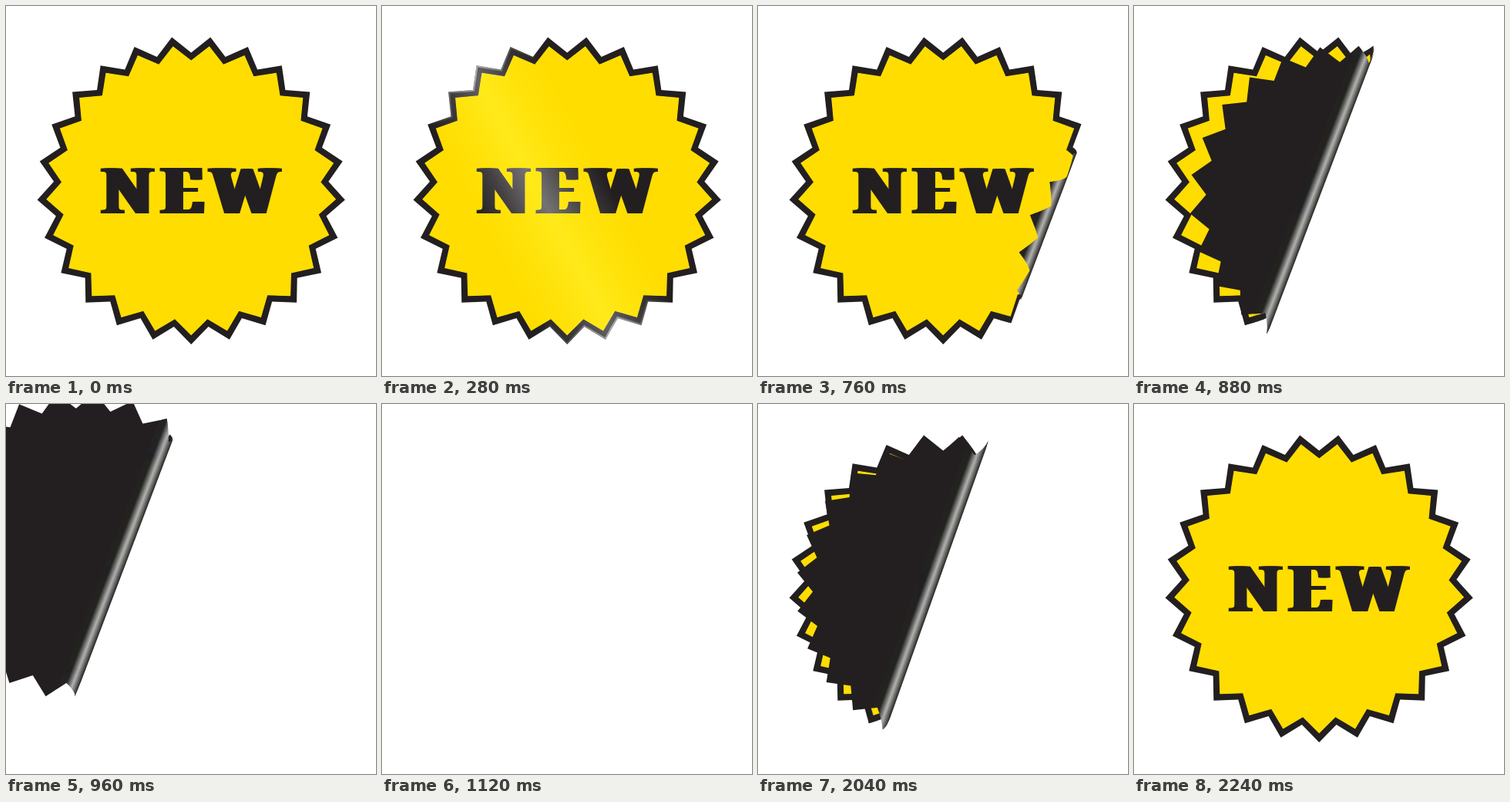
Recreate the animation shown at these times as an HTML page with a canvas. Size 480x480 px, loop 2400 ms.

```html
<!DOCTYPE html>
<html>
<head>
<meta charset="utf-8">
<style>
  html, body { margin: 0; width: 100%; height: 100%; overflow: hidden; background: #fff; }
  canvas { display: block; width: 480px; height: 480px; }
</style>
</head>
<body>
<canvas id="stage" width="480" height="480"></canvas>
<script>
const ctx = document.getElementById('stage').getContext('2d');
const INK = '#231f20', YELLOW = '#ffdd00';
const LOOP = 2400, STEP = 40;
const degrees = d => d * Math.PI / 180;
const PEEL_TILT = degrees(20.8), RETURN_TILT = degrees(19.6);
const SHINE_TILT = degrees(-28);
const ROLL = 24.5;                   // radius of the curl
const HALF_TURN = Math.PI * ROLL;
const SPEED = 47.1 / STEP;           // px per ms
const SLICES = 32;                   // per quarter of the curl
const FAR = 800;

function star(outer, inner) {
  const path = new Path2D();
  for (let i = 0; i < 50; i++) {
    const angle = Math.PI / 2 + i * Math.PI / 25;
    const radius = i % 2 ? inner : outer;
    path.lineTo(radius * Math.cos(angle), radius * Math.sin(angle));
  }
  path.closePath();
  return path;
}
const rim = star(200, 178.5);
const face = star(188.3, 168.5);
const border = new Path2D(rim);
border.addPath(star(187.5, 167.7));

function drawFront() {
  ctx.fillStyle = INK;
  ctx.fill(border, 'evenodd');
  ctx.fillStyle = YELLOW;
  ctx.fill(face);
  ctx.fillStyle = INK;
  ctx.font = '900 81px "Noto Serif", serif';
  ctx.letterSpacing = '13px';
  ctx.textAlign = 'center';
  // Sideways copies fatten the stems and keep the serifs thin.
  for (let dx = -5; dx <= 5; dx += 2.5) ctx.fillText('NEW', 5.5 + dx, 30);
}

function drawBack(color) {
  ctx.fillStyle = color;
  ctx.fill(rim);
}

// Draws the strip s0..s1 of the flat sticker squeezed into x0..x1.
function strip(tilt, s0, s1, x0, x1, draw) {
  const scale = (x1 - x0) / (s1 - s0);
  const overlap = .6 / Math.abs(scale);
  ctx.save();
  ctx.rotate(tilt);
  ctx.translate(x0, 0);
  ctx.scale(scale, 1);
  ctx.translate(-s0, 0);
  ctx.beginPath();
  ctx.rect(s0 - overlap, -260, s1 - s0 + overlap, 520);
  ctx.clip();
  ctx.rotate(-tilt);
  draw();
  ctx.restore();
}

function curlColor(depth) {
  const level = 33 + 145 * Math.max(0, 1 - Math.abs(depth - 8.5) / 8.5);
  return `rgb(${level},${level},${level})`;
}

function drawPeel(tilt, edge) {
  const start = edge - ROLL, end = start + HALF_TURN;
  strip(tilt, start - FAR, start, start - FAR, start, drawFront);
  for (let i = 0; i < 2 * SLICES; i++) {
    const rising = i < SLICES;
    const height = k => rising ? k / SLICES : 2 - k / SLICES;
    const arc = k => rising ? Math.asin(height(k)) : Math.PI - Math.asin(height(k));
    const color = curlColor(ROLL * (1 - height(i + .5)));
    strip(tilt, start + ROLL * arc(i), start + ROLL * arc(i + 1),
      start + ROLL * height(i), start + ROLL * height(i + 1),
      rising ? drawFront : () => drawBack(color));
  }
  strip(tilt, end, end + FAR, start, start - FAR, () => drawBack(INK));
}

function drawShine(center) {
  const dx = Math.cos(SHINE_TILT), dy = Math.sin(SHINE_TILT);
  const band = peak => {
    const a = center - 85, b = center + 85;
    const g = ctx.createLinearGradient(a * dx, a * dy, b * dx, b * dy);
    [0, .4, 1, .4, 0].forEach((level, i) =>
      g.addColorStop(i / 4, `rgba(255,255,255,${peak * level})`));
    return g;
  };
  ctx.save();
  ctx.clip(rim);
  ctx.globalCompositeOperation = 'color-dodge';
  ctx.fillStyle = band(.3);
  ctx.fill(rim);
  ctx.globalCompositeOperation = 'source-over';
  ctx.fillStyle = band(.1);
  ctx.fill(face);
  ctx.strokeStyle = band(.5);
  ctx.lineWidth = 4;
  ctx.stroke(rim);
  ctx.restore();
}

function render(now) {
  const t = Math.floor(now % LOOP / STEP) * STEP;
  ctx.setTransform(1, 0, 0, 1, 0, 0);
  ctx.clearRect(0, 0, 480, 480);
  ctx.translate(240.2, 239);
  if (t >= 720 && t < 1120) drawPeel(PEEL_TILT, 3 - (t - 880) * SPEED);
  else if (t >= 1840 && t < 2240) drawPeel(RETURN_TILT, -9 + (t - 2040) * SPEED);
  else if (t < 720 || t >= 2240) drawFront();
  if (t >= 160 && t < 480) drawShine(140 + (t - 400) * 1.45);
}

const begin = performance.now();
(function tick() {
  render(performance.now() - begin);
  requestAnimationFrame(tick);
})();
</script>
</body>
</html>
```
